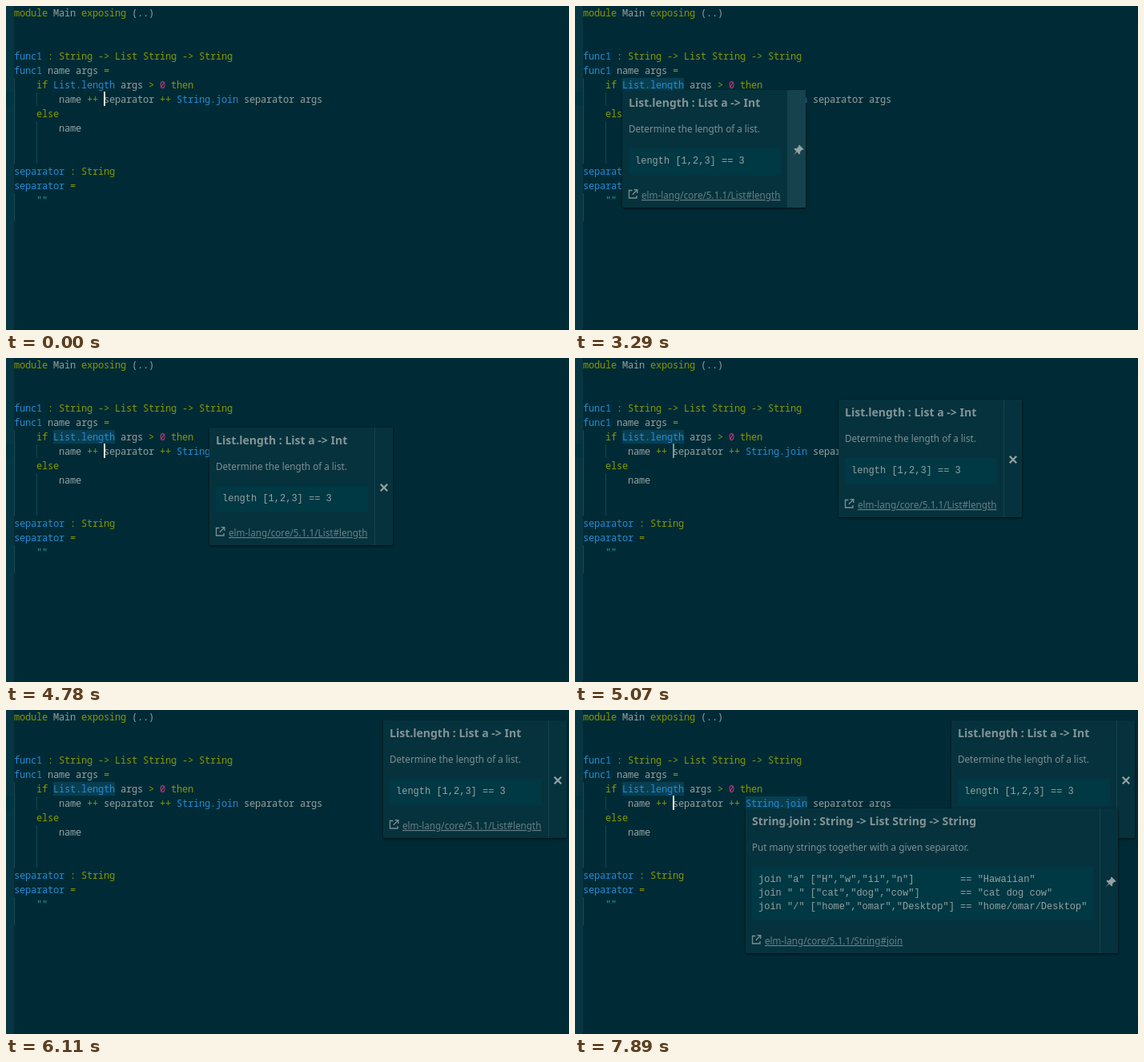
These frames come from a looping animation (703x405 px, 8 s). An HTML page:

```html
<!DOCTYPE html>
<html lang="en">
<head>
<meta charset="utf-8">
<title>Editor hints</title>
<style>
html, body { margin: 0; width: 100%; height: 100%; overflow: hidden; background: #002b36; }
svg { display: block; width: 100%; height: 100%; }
text { white-space: pre; }
.src { font: 12px "Noto Sans Mono", "DejaVu Sans Mono", monospace; letter-spacing: -0.2px; }
.title { font: 600 14px "Noto Sans", "Open Sans", sans-serif; fill: #839496; }
.strong { font-weight: 700; }
.body { font: 11.7px "Noto Sans", "Open Sans", sans-serif; fill: #7d9093; }
.link { fill: #668087; text-decoration: underline; }
.code { font: 12px "Liberation Mono", "Courier New", monospace; fill: #93a1a1; }
.panel { filter: drop-shadow(0 1px 1.5px rgba(0, 0, 0, 0.75)); }
</style>
</head>
<body>
<svg id="stage" viewBox="0 0 703 405"></svg>
<script>
const LOOP = 8000;
const CHAR = 7, LINE = 18, LEFT = 10;
const INK = { g: '#859900', b: '#268bd2', t: '#93a1a1', m: '#d33682', c: '#2aa198' };
const stage = document.getElementById('stage');

function add(parent, tag, attrs, content) {
  const el = document.createElementNS('http://www.w3.org/2000/svg', tag);
  for (const key in attrs) el.setAttribute(key, attrs[key]);
  if (content !== undefined) el.textContent = content;
  parent.appendChild(el);
  return el;
}

function box(parent, x, y, width, height, fill, rx = 0) {
  return add(parent, 'rect', { x, y, width, height, fill, rx });
}

// Each line: row, then column, ink and text of every token.
const SOURCE = [
  [0, [0, 'g', 'module'], [7, 't', 'Main'], [12, 'g', 'exposing'], [21, 't', '(..)']],
  [3, [0, 'b', 'func1'], [6, 'g', ': String -> List String -> String']],
  [4, [0, 'b', 'func1'], [6, 't', 'name args'], [16, 'g', '=']],
  [5, [4, 'g', 'if'], [7, 'b', 'List.length'], [19, 't', 'args'], [24, 'g', '>'],
    [26, 'm', '0'], [28, 'g', 'then']],
  [6, [8, 't', 'name'], [13, 'g', '++'], [16, 't', 'separator'], [26, 'g', '++'],
    [29, 'b', 'String.join'], [41, 't', 'separator args']],
  [7, [4, 'g', 'else']],
  [8, [8, 't', 'name']],
  [11, [0, 'b', 'separator'], [10, 'g', ': String']],
  [12, [0, 'b', 'separator'], [10, 'g', '=']],
  [13, [4, 'c', '""']]
];

box(stage, 0, 0, 703, 405, '#002b36');
box(stage, 0, 0, 10, 405, '#073642');
box(stage, 0, 107, 10, 18, '#003440');
const markLength = box(stage, 59, 90, 77, 17, '#073f51');
const markJoin = box(stage, 213, 108, 77, 17, '#073f51');
for (const [x, y, h] of [[10, 90, 107], [38, 108, 17], [38, 144, 53], [10, 234, 35]]) {
  box(stage, x, y, 1, h, '#0e4a59');
}
for (const [row, ...tokens] of SOURCE) {
  for (const [col, ink, text] of tokens) {
    add(stage, 'text', { class: 'src', x: LEFT + col * CHAR, y: 13 + row * LINE, fill: INK[ink] }, text);
  }
}
const cursor = box(stage, 122, 107, 2, 18, '#eee8d5');

function makePanel(width, info) {
  const codeH = info.code.length * 17 + 16;
  const height = codeH + 114;
  const g = add(stage, 'g', { class: 'panel' });
  box(g, 0, 0, width, height, '#06323d', 1);
  const hover = box(g, width - 23, 0, 23, height, '#16424d');
  box(g, width - 23, 0, 1, height, '#14424d');

  const title = add(g, 'text', { class: 'title', x: 8, y: 21 });
  add(title, 'tspan', {}, info.module + '.');
  add(title, 'tspan', { class: 'strong' }, info.name);
  add(title, 'tspan', {}, ' : ' + info.type);
  add(g, 'text', { class: 'body', x: 8, y: 53 }, info.about);

  box(g, 8, 73, width - 39, codeH, '#003844', 2);
  info.code.forEach((line, i) => {
    add(g, 'text', { class: 'code', x: 16, y: 92 + i * 17 }, line);
  });

  add(g, 'path', {
    d: 'M5 1.5H1V11H10.5V8M7 .7H11.3V5M11 1L5.3 6.7',
    transform: `translate(7.5 ${height - 23})`,
    fill: 'none', stroke: '#7d9093', 'stroke-width': 1.3
  });
  add(g, 'text', { class: 'body link', x: 24, y: height - 11 },
    `elm-lang/core/5.1.1/${info.module}#${info.name}`);

  const at = `translate(${width - 9} ${Math.round(height / 2) + 1})`;
  const pin = add(g, 'path', {
    d: 'M1-6.5L6.5-1L5.5 0L4.5-.3L2 2.2L2.2 4.5L1 5.5L-1.8 2.6L-6.5 6.5L-2.6 1.8L-5.5-1L-4.5-2.2L-2.2-2L.3-4.5L0-5.5Z',
    transform: at, fill: '#93a1a1'
  });
  const close = add(g, 'path', {
    d: 'M-4.2-4.2L4.2 4.2M4.2-4.2L-4.2 4.2',
    transform: `translate(${width - 11} ${Math.round(height / 2) + 1})`,
    fill: 'none', stroke: '#93a1a1', 'stroke-width': 2.3
  });
  return { g, hover, pin, close };
}

const lengthPanel = makePanel(229, {
  module: 'List', name: 'length', type: 'List a -> Int',
  about: 'Determine the length of a list.',
  code: ['length [1,2,3] == 3']
});
const joinPanel = makePanel(465, {
  module: 'String', name: 'join', type: 'String -> List String -> String',
  about: 'Put many strings together with a given separator.',
  code: [
    'join "a" ["H","w","ii","n"]        == "Hawaiian"',
    'join " " ["cat","dog","cow"]       == "cat dog cow"',
    'join "/" ["home","omar","Desktop"] == "home/omar/Desktop"'
  ]
});
joinPanel.g.setAttribute('transform', 'translate(213 123)');

// Drag path: time, x, y
const DRAG = [[4180, 59, 105], [4780, 254, 87], [5370, 406, 17], [5960, 471, 13],
  [6200, 471, 13], [6300, 470, 13]];

const clamp = v => Math.max(0, Math.min(1, v));
const ramp = (t, from, to) => clamp((t - from) / (to - from));
const ease = v => v * v * (3 - 2 * v);
const show = (el, on) => el.setAttribute('visibility', on ? 'inherit' : 'hidden');

function dragAt(t) {
  let [, x, y] = DRAG[0];
  for (let i = 1; i < DRAG.length; i++) {
    const [t0, x0, y0] = DRAG[i - 1], [t1, x1, y1] = DRAG[i];
    const k = ramp(t, t0, t1);
    if (t >= t0) {
      x = x0 + (x1 - x0) * k;
      y = y0 + (y1 - y0) * k;
    }
  }
  return [Math.round(x), Math.round(y)];
}

function blink(t) {
  const p = ((t + 20) % 800) / 800;
  if (p < 0.67) return 1 - ease(ramp(p, 0.2, 0.55));
  return ease(ramp(p, 0.65, 0.9));
}

function fade(el, k) {
  show(el, k > 0);
  el.setAttribute('opacity', k);
}

function draw(t) {
  cursor.setAttribute('opacity', blink(t));

  const first = ramp(t, 1480, 1640);
  fade(markLength, first);
  fade(lengthPanel.g, first);
  lengthPanel.g.setAttribute('transform', `translate(${dragAt(t)})`);
  show(lengthPanel.hover, t >= 3290 && t < 4180);
  show(lengthPanel.pin, t < 3890);
  show(lengthPanel.close, t >= 3890);

  const second = ramp(t, 7730, 7880);
  fade(markJoin, second);
  fade(joinPanel.g, second);
  show(joinPanel.hover, false);
  show(joinPanel.close, false);
}

const start = performance.now();
function tick() {
  draw((performance.now() - start) % LOOP);
  requestAnimationFrame(tick);
}
tick();
</script>
</body>
</html>
```
